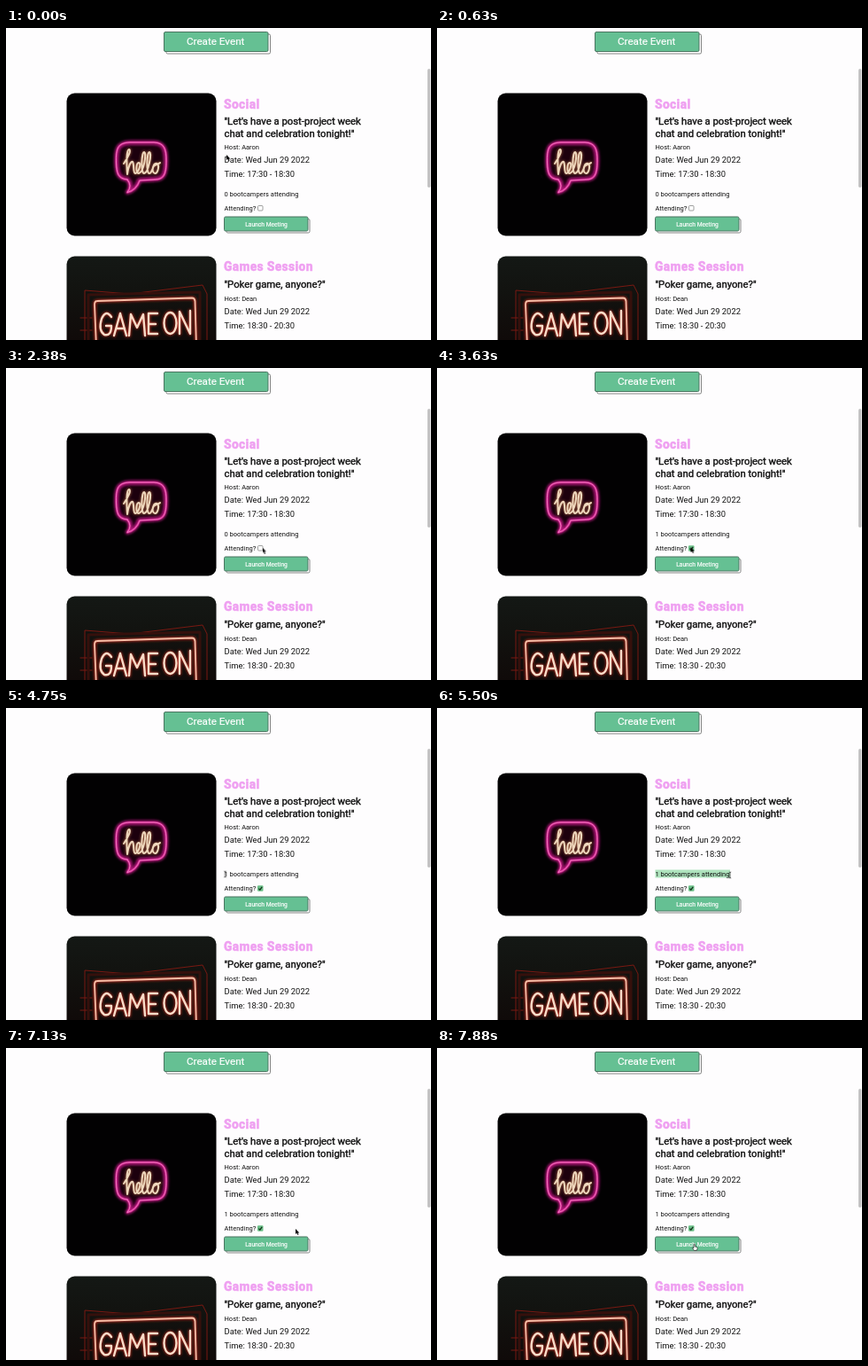
An HTML page that plays this animation: 480 px wide and 352 px high, repeating every 8000 ms.

```html
<!DOCTYPE html>
<html lang="en">
<head>
<meta charset="utf-8">
<title>Events</title>
<style>
html, body { margin: 0; width: 100%; height: 100%; overflow: hidden; background: #fefdfe; }
svg { display: block; width: 480px; height: 352px; font-family: Roboto, sans-serif; fill: #111; }
.heading { font-size: 13.8px; font-weight: 900; letter-spacing: .35px; fill: #efa0f1; stroke: #efa0f1; stroke-width: .4px; }
.title { font-size: 11.3px; stroke: #111; stroke-width: .4px; }
.time { font-size: 9.4px; }
.small { font-size: 7.5px; }
.label { fill: #fff; text-anchor: middle; stroke: #fff; stroke-width: .2px; }
.face { fill: #65c093; stroke: #4a7560; }
.shadow { fill: #fff; stroke: #666; stroke-width: .8px; }
.neon { fill: none; stroke-linecap: round; stroke-linejoin: round; }

/* One step of 125ms is 1.5625% of the loop. */
.before, .after, .arrow, .beam, .hand, .selection { animation: 8s step-end infinite; }
.before { animation-name: before; }
.after { animation-name: after; }
.arrow { animation-name: arrow; }
.beam { animation-name: beam; }
.hand { animation-name: hand; }
.selection { animation-name: select; transform-origin: 246.5px 0; fill: #aee3bd; }
.cursor { animation: move 8s infinite; }

@keyframes before { 0% { opacity: 1 } 39.0625%, 100% { opacity: 0 } }
@keyframes after { 0% { opacity: 0 } 39.0625%, 100% { opacity: 1 } }
@keyframes arrow {
  0%, 70.3125% { opacity: 1 }
  53.125%, 90.625%, 100% { opacity: 0 }
}
@keyframes beam {
  0%, 70.3125%, 100% { opacity: 0 }
  53.125% { opacity: 1 }
}
@keyframes hand { 0% { opacity: 0 } 90.625%, 100% { opacity: 1 } }
@keyframes select {
  0% { transform: scaleX(0) }
  59.375% { transform: scaleX(0); animation-timing-function: steps(6, end) }
  68.75% { transform: scaleX(1) }
  81.25%, 100% { transform: scaleX(0) }
}
@keyframes move {
  0% { transform: translate(249px, 143px); animation-timing-function: steps(7, end) }
  10.9375% { transform: translate(64px, 172px); animation-timing-function: step-end }
  12.5% { transform: translate(64px, 172px); animation-timing-function: steps(10, end) }
  28.125% { transform: translate(289.5px, 202.5px); animation-timing-function: step-end }
  34.375% { transform: translate(289.5px, 202.5px); animation-timing-function: steps(2, end) }
  37.5% { transform: translate(286.5px, 202px); animation-timing-function: step-end }
  50% { transform: translate(286.5px, 202px); animation-timing-function: steps(4, end) }
  56.25% { transform: translate(247.5px, 184px); animation-timing-function: step-end }
  59.375% { transform: translate(247.5px, 184px); animation-timing-function: steps(6, end) }
  68.75% { transform: translate(331px, 185px); animation-timing-function: steps(5, end) }
  76.5625% { transform: translate(365px, 187px); animation-timing-function: step-end }
  84.375% { transform: translate(365px, 187px); animation-timing-function: steps(6, end) }
  93.75%, 100% { transform: translate(289px, 221px); animation-timing-function: step-end }
}
</style>
</head>
<body>
<svg viewBox="0 0 480 352">
  <defs>
    <clipPath id="frame"><rect x="68.500" y="257.500" width="169" height="160" rx="9"/></clipPath>
    <filter id="glow" x="-30%" y="-30%" width="160%" height="160%"><feGaussianBlur stdDeviation="1.8"/></filter>
    <linearGradient id="wall" x1="0" y1="0" x2="0" y2="1">
      <stop offset="0" stop-color="#141815"/>
      <stop offset=".4" stop-color="#121310"/>
      <stop offset="1" stop-color="#100a09"/>
    </linearGradient>
    <path id="bubble" d="M137 171C126 170 125 163 124.500 152C124 136 126 129.500 140 129H167C179 129.500 181 137 181 150C181 165 178 171 168 171L151 172Q147 183 137 185.500Q143 178 137 171Z"/>
    <path id="hello" d="M133 153C137 147 142 138 139 137C136 137 136 152 137 165C138 156 141 150 143 151C145 153 143 163 146 164C150 163 153 153 150 152C147 152 146 164 150 164C156 162 159 141 156 140C153 140 152 164 156 164C161 163 165 141 162 140C159 140 158 165 162 164C164 164 165 160 166 158C167 151 173 151 172 158C171 167 164 165 166 157C168 153 171 155 174 152"/>
    <path id="sign" d="M119 326Q113 317 108 328Q104 341 111 346Q119 348 119 336H113M122 347L129 322L136 347M125 339H134M139 347L141 323L148 338L155 323L157 347M171 322H161V345H171M161 334H169M178.500 333a7 12 0 1 0 14 0a7 12 0 1 0-14 0M196 345V320L208 345V319"/>
    <path id="border" d="M102 360L100 312Q100 308 103 308L210 304.500Q213 304.500 213.500 308L215 360"/>
  </defs>

  <rect class="shadow" x="181" y="7" width="117.500" height="22" rx="1.500"/>
  <rect class="face" x="178.500" y="4.500" width="117.500" height="22" rx="1.500"/>
  <text class="label" x="236.700" y="19" font-size="11.7">Create Event</text>
  <rect x="476" y="46" width="3.500" height="134" rx="1.750" fill="#c3c2c3"/>

  <rect x="68.500" y="73.500" width="169" height="161" rx="9" fill="#020102"/>
  <g class="neon">
    <use href="#bubble" fill="#1c0411" stroke="#b01478" stroke-width="4.500" filter="url(#glow)"/>
    <use href="#bubble" stroke="#d3268f" stroke-width="2.200"/>
    <use href="#bubble" stroke="#f48cc8" stroke-width=".8"/>
    <use href="#hello" stroke="#8a5038" stroke-width="3" filter="url(#glow)"/>
    <use href="#hello" stroke="#efd8bd" stroke-width="2"/>
  </g>

  <text class="heading" x="246" y="90.500">Social</text>
  <text class="title" x="246.500" y="109">"Let's have a post-project week</text>
  <text class="title" x="246.500" y="122.500">chat and celebration tonight!"</text>
  <text class="small" x="246.500" y="137">Host: Aaron</text>
  <text class="time" x="246.500" y="152.300">Date: Wed Jun 29 2022</text>
  <text class="time" x="246.500" y="168">Time: 17:30 - 18:30</text>
  <rect class="selection" x="246.500" y="182.500" width="84.500" height="9"/>
  <text class="small before" x="246.500" y="189.800">0 bootcampers attending</text>
  <text class="small after" x="246.500" y="189.800">1 bootcampers attending</text>
  <text class="small" x="246.500" y="206.300">Attending?</text>
  <rect class="before" x="284.500" y="200.500" width="5.500" height="5.500" rx="1" fill="#fff" stroke="#777" stroke-width=".7"/>
  <g class="after">
    <rect x="284" y="200.300" width="6.500" height="6.500" rx="1" fill="#6cc088"/>
    <path d="M285.500 203.700L286.800 205.200L289.200 201.900" fill="none" stroke="#12301c" stroke-width="1.200"/>
  </g>
  <rect class="shadow" x="249" y="215.500" width="94" height="15.500" rx="1.500"/>
  <rect class="face" x="246.500" y="213" width="94.500" height="16" rx="1.500"/>
  <text class="label" x="294" y="223.600" font-size="6.700">Launch Meeting</text>

  <g clip-path="url(#frame)">
    <rect x="68" y="257" width="170" height="95" fill="url(#wall)"/>
    <g class="neon">
      <path d="M89 352V296L140 300L222 290L227 300V352M84 327H97M84 341H97" stroke="#7a1912" stroke-width="1"/>
      <path d="M93 352V301L219 298V352" stroke="#35100c" stroke-width="3"/>
      <use href="#border" stroke="#a8281a" stroke-width="3.500" filter="url(#glow)"/>
      <use href="#border" stroke="#f5bda6" stroke-width="1.800"/>
      <use href="#sign" stroke="#a8281a" stroke-width="3.500" filter="url(#glow)"/>
      <use href="#sign" stroke="#f8dcc8" stroke-width="2.400"/>
    </g>
  </g>

  <text class="heading" x="246" y="274.300">Games Session</text>
  <text class="title" x="246.500" y="293">"Poker game, anyone?"</text>
  <text class="small" x="246.500" y="307.500">Host: Dean</text>
  <text class="time" x="246.500" y="323">Date: Wed Jun 29 2022</text>
  <text class="time" x="246.500" y="338.700">Time: 18:30 - 20:30</text>

  <g class="cursor">
    <path class="arrow" d="M0 0V6L1.400 4.800L2.500 7L3.500 6.500L2.500 4.400H4.300Z" fill="#060506"/>
    <path class="beam" d="M-1.200 0Q0 0 0 1V6Q0 7-1.200 7M1.200 0Q0 0 0 1M1.200 7Q0 7 0 6" fill="none" stroke="#222" stroke-width=".7"/>
    <path class="hand" d="M1 .5Q1.700-.2 2.300.5V3L4.800 3.700Q5.300 4 5 5.500L4.300 7.500H1.500L-.6 4.700Q-.3 3.800 1 4.600Z" fill="#fff" stroke="#222" stroke-width=".7"/>
  </g>
</svg>
</body>
</html>
```
